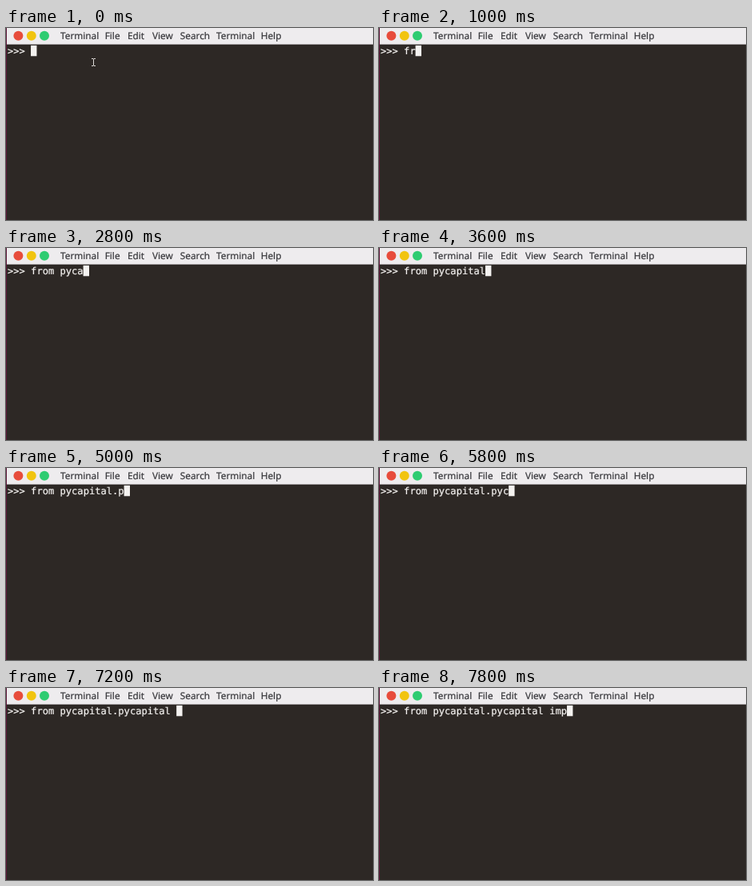
An HTML page that plays this animation: 459x241 px, repeating every 8000 ms.

```html
<!DOCTYPE html>
<html lang="en">
<head>
<meta charset="utf-8">
<title>Terminal typing</title>
<style>
  html, body { margin: 0; width: 100%; height: 100%; overflow: hidden; background: #2d2825; }
  svg { display: block; }
  text { text-rendering: geometricPrecision; white-space: pre; stroke-width: .22px; }
  #menu { font: 11.8px "Noto Sans", "Open Sans", sans-serif; fill: #3a3a3e; stroke: #3a3a3e; }
  #line { font: 12.1px "DejaVu Sans Mono", monospace; fill: #f4f2f0; stroke: #f4f2f0; }
</style>
</head>
<body>
<svg width="459" height="241" viewBox="0 0 459 241">
  <rect width="459" height="241" fill="#2d2825"/>
  <rect width="1" height="241" fill="#5c1538"/>
  <rect x="1" width="458" height="20.6" fill="#eeecee"/>
  <circle cx="15.4" cy="9.7" r="6" fill="#e74c3c"/>
  <circle cx="31.8" cy="9.7" r="6" fill="#f1c40f"/>
  <circle cx="48" cy="9.7" r="6" fill="#2ecc71"/>
  <text id="menu" y="14.1"><tspan x="68">Terminal</tspan><tspan x="123.7">File</tspan><tspan x="152">Edit</tspan><tspan x="183">View</tspan><tspan x="217.8">Search</tspan><tspan x="263">Terminal</tspan><tspan x="318.7">Help</tspan></text>
  <text id="line" x="2" y="33"></text>
  <rect id="cursor" y="21.9" width="7.4" height="13.4" fill="#f4f2f0"/>
  <path id="pointer" d="M107 38.5h2l.5.5.5-.5h2M109.5 39v8M107 47.5h2l.5-.5.5.5h2" fill="none" stroke="#dedbd8"/>
</svg>
<script>
  const LOOP = 8000, STEP = 200, PITCH = 7.285, LEFT = 2;
  const PROMPT = ">>> ";
  // Bursts of typing: start in ms, number of screen updates, text
  const BURSTS = [
    [600, 1, "f"], [1000, 3, "rom"], [2000, 3, " py"],
    [2800, 1, "ca"], [3000, 4, "pital"],
    [4800, 2, ".p"], [5400, 1, "y"], [5800, 5, "capital"], [7200, 4, " imp"]
  ];
  const [line, cursor, pointer] = ["line", "cursor", "pointer"].map(id => document.getElementById(id));
  const show = (el, on) => el.setAttribute("visibility", on ? "visible" : "hidden");

  function typed(t) {
    return BURSTS.map(([start, steps, text]) => {
      const done = Math.floor((t - start) / STEP) + 1;
      const share = Math.min(1, Math.max(0, done / steps));
      return text.slice(0, Math.floor(text.length * share));
    }).join("");
  }

  function draw(t) {
    const text = PROMPT + typed(t);
    line.textContent = text;
    cursor.setAttribute("x", LEFT + text.length * PITCH - 0.1);
    show(cursor, t < 4200 || t >= 4600); // blinks off while idle
    show(pointer, t < 600);
  }

  const start = performance.now();
  function tick() {
    draw((performance.now() - start) % LOOP);
    requestAnimationFrame(tick);
  }
  draw(0);
  requestAnimationFrame(tick);
</script>
</body>
</html>
```
